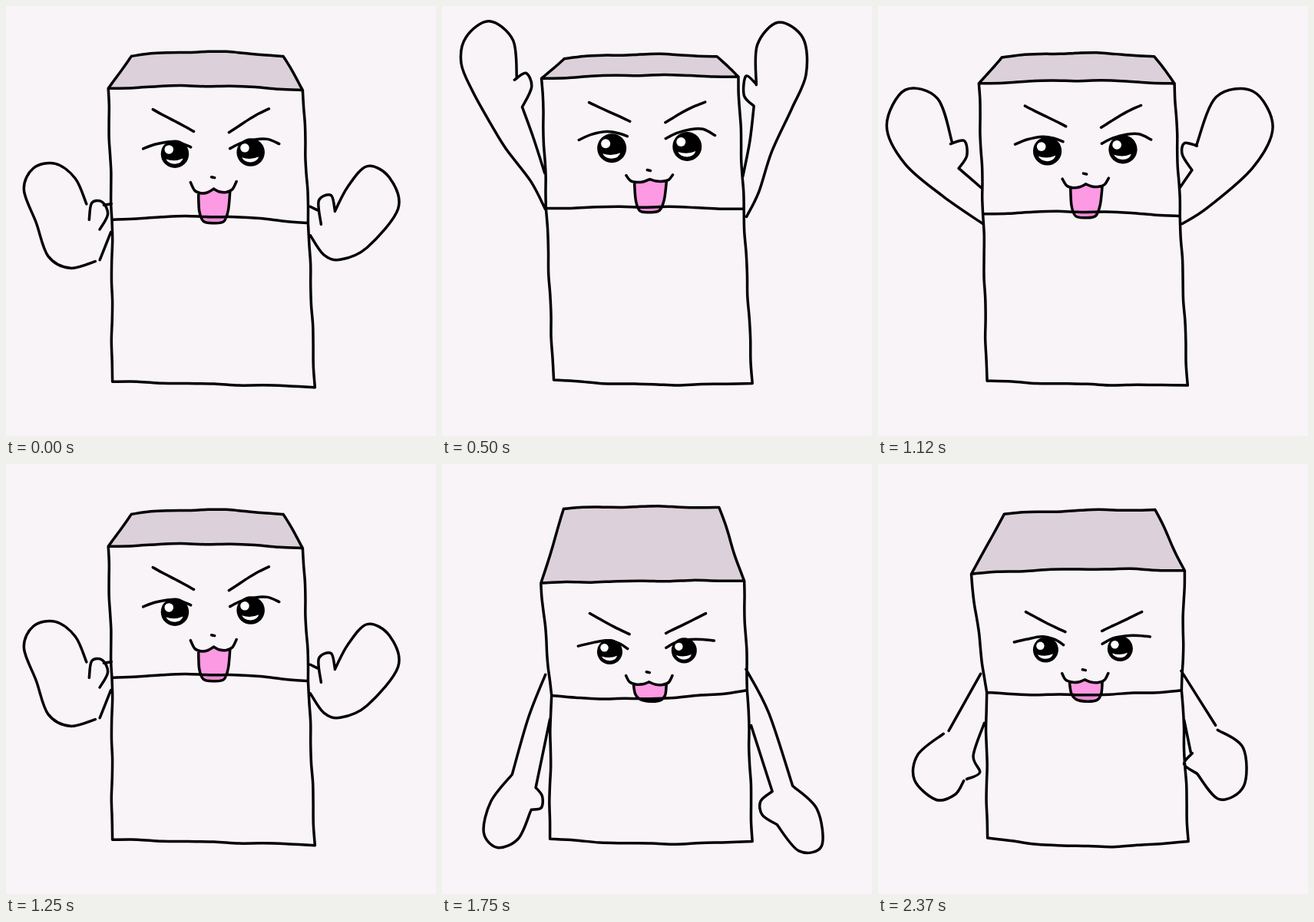
Recreate the animation shown at these times as an HTML page. Size 560 by 560 pixels, loop 2500 ms.

```html
<!DOCTYPE html>
<html lang="en">
<head>
<meta charset="utf-8">
<title>Cheering box</title>
<style>
  html, body { margin: 0; width: 100%; height: 100%; overflow: hidden; background: #f8f4f8; }
  svg { display: block; width: 100vw; height: 100vh; }
  .ink { fill: none; stroke: #000; stroke-width: 3.5; stroke-linecap: round; stroke-linejoin: round; }
  .roof { fill: #dcd1da; }
  .tongue { fill: #fc9ae4; }
  .chin { fill: #e68ccf; }
  .shine { fill: #fff; }

  .pose { visibility: hidden; animation: 2500ms step-end infinite; }
  .rest { animation-name: rest; animation-duration: 1250ms; }
  .mid { animation-name: mid; }
  .peak { animation-name: peak; }
  .over { animation-name: over; }
  .down { animation-delay: -1250ms; }
  @keyframes rest { 0% { visibility: visible } 20%, 100% { visibility: hidden } }
  @keyframes mid {
    0%, 20% { visibility: hidden }
    10%, 44.8% { visibility: visible }
    50%, 100% { visibility: hidden }
  }
  @keyframes peak {
    0%, 24.8% { visibility: hidden }
    20%, 34.8% { visibility: visible }
    44.8%, 100% { visibility: hidden }
  }
  @keyframes over {
    0% { visibility: hidden }
    24.8% { visibility: visible }
    34.8%, 100% { visibility: hidden }
  }
</style>
</head>
<body>
<svg id="stage" viewBox="0 0 560 560">
  <defs>
    <g id="eye">
      <circle r="19"/>
      <circle class="shine" cx="-8" cy="-6" r="6"/>
      <path class="shine" d="M-12 7Q0 11 11 6Q9 13 0 13.500Q-9 13-12 7Z"/>
    </g>
  </defs>
</svg>
<script>
// Box edges: x1, y1, x2, y2, bow. brow: y, slant. mouth: y, depth.
// Arms: "|" is a corner, ";" a new stroke.
const rest = {
  ridge: [164, 65, 361, 66, -6], brim: [133, 108, 387, 110, -5],
  waist: [138, 279, 394, 283, -7], foot: [138, 489, 402, 496, 0],
  brow: [134, 30], lid: 176, eye: 191, squint: .3, mouth: [229, 14], tongue: 282,
  arms: '105,258 90,225 65,205 36,211 24,240 39,283 55,326 83,342 116,332;' +
    '109,278 112,257 126,256 133,272 122,291; 128,260 138,258; 136,295 122,330;' +
    '429,267 445,235 470,209 500,223 510,264 470,314 435,331 413,324 397,299;' +
    '411,285 407,254 423,246 429,266; 396,262 407,267'
};
const raised = {
  ridge: [160, 68, 358, 66, -4], brim: [130, 95, 386, 93, -4],
  waist: [136, 264, 393, 265, -3], foot: [145, 487, 404, 491, 4],
  brow: [125, 26], lid: 163, eye: 183.5, squint: 0, mouth: [220, 9], tongue: 268,
  arms: '98,94 92,45 62,20 32,40 25,75 40,112 64,156 84,187 115,229 135,265;' +
    '95,96 110,88 117,106 104,131 | 120,172 133,217;' +
    '410,103 410,50 438,22 470,42 474,90 455,133 430,190 412,242 397,275;' +
    '410,102 396,92 394,117 406,131 | 401,175 392,222'
};
const lowered = {
  ridge: [159, 58, 361, 57, -2], brim: [129, 155, 393, 152, -1],
  waist: [142, 302, 398, 295, 7], foot: [140, 488, 404, 491, 5],
  brow: [195, 26], lid: 230, eye: 244, squint: 1, mouth: [276, 11], tongue: 309,
  arms: '135,275 112,330 91,404 | 63,440 55,480 72,500 99,488 116,452;' +
    '141,332 122,422 | 131,433 130,448 117,450;' +
    '396,268 425,325 457,419 | 488,450 495,497 465,504 436,470 | 418,458 415,440 430,426; 402,340 430,426'
};
const falling = {
  ...lowered,
  ridge: [165, 65, 361, 60, -2], brim: [121, 143, 399, 139, -4],
  waist: [141, 298, 396, 295, 4], foot: [142, 487, 404, 491, 9],
  brow: [193, 25], lid: 225, eye: 241.5, mouth: [273, 11],
  arms: '134,274 92,348; 85,352 52,378 48,412 75,437 100,430 111,413; 139,337 124,380 132,402 115,411;' +
    '395,270 440,341; 443,347 475,370 477,420 445,436 415,403 | 399,391 410,376; 398,333 408,375'
};
const mix = (a, b) => Array.isArray(a) ? a.map((v, i) => mix(v, b[i])) : (a + b) / 2;
const rising = {};
for (const key in rest) rising[key] = mix(rest[key], raised[key]);
rising.arms = '97,178 78,120 35,110 12,155 35,205 85,248 136,284; 95,180 113,175 116,195 105,212 | 136,238;' +
  '415,182 440,118 488,112 514,158 488,210 430,262 397,284; 416,182 399,178 397,193 409,213 | 392,238';

const parse = text => text.trim().split(/\s+/).map(p => p.split(',').map(Number));

// Points along a line that sags by bow.
const edge = ([x1, y1, x2, y2, bow = 0]) => Array.from({ length: 9 }, (_, i) => {
  const t = i / 8;
  return [x1 + (x2 - x1) * t, y1 + (y2 - y1) * t + bow * 4 * t * (1 - t)];
});

// Unsteady pen; lift shifts the redrawn poses.
const pen = (seed, lift) => ([x, y]) => [
  x + .7 * Math.sin(x * .04 + y * .07 + seed),
  y + .7 * Math.sin(x * .07 - y * .04 + seed) + lift
];

// Smooth path through the points of each run; runs meet in corners.
function curve(runs, move) {
  let d = '';
  for (const run of runs) {
    const p = run.map(move);
    d += (d ? 'L' : 'M') + p[0];
    for (let i = 0; i < p.length - 1; i++) {
      const b = p[i], c = p[i + 1], a = p[i - 1] || b, e = p[i + 2] || c;
      const c1 = b.map((v, k) => v + (c[k] - a[k]) / 6);
      const c2 = c.map((v, k) => v - (e[k] - b[k]) / 6);
      d += `C${c1} ${c2} ${c}`;
    }
  }
  return d;
}

function armStrokes(text) {
  return text.split(';').map(stroke => {
    const runs = stroke.split('|').map(parse);
    runs.slice(1).forEach((run, i) => run.unshift(runs[i].at(-1)));
    return runs;
  });
}

function boxStrokes({ ridge, brim, waist, foot }) {
  const link = (a, b, k) => edge([a[k], a[k + 1], b[k], b[k + 1]]);
  const roof = [edge(ridge), link(ridge, brim, 2), edge(brim).reverse(), link(brim, ridge, 0)];
  const side = k => [link(brim, waist, k), link(waist, foot, k)];
  return [roof, side(0), side(2), [edge(waist)], [edge(foot)]];
}

function faceStrokes({ brow: [by, slant], lid, squint, mouth: [my, depth], tongue }) {
  const lip = [[30, 0], [25, .75], [17, 1], [8, .95], [0, .65]].map(([x, k]) => [x, my + depth * k]);
  const half = side => lip.map(([x, y]) => [270 + side * x, y]);
  const top = my + depth;
  const side = [[21, top], [19, top + (tongue - top) * .6], [13, tongue - 2]];
  return {
    tongue: [[...side.map(([x, y]) => [271 - x, y]), [271, tongue],
      ...side.map(([x, y]) => [271 + x, y]).reverse()]],
    lines: [
      [edge([192, by, 244, by + slant])],
      [edge([291, by + slant, 343, by, -1])],
      [[[178, lid + 12 - 5 * squint], [194, lid + 4], [214, lid], [230, lid + 3], [241, lid + 7 + 3 * squint]]],
      [[[292, lid + 9 + squint], [306, lid + 2], [324, lid - 2], [340, lid - 2], [355, lid + 6 - 6 * squint]]],
      [[[267, my - 6], [271, my - 5]]],
      [half(-1), half(1).reverse()]
    ]
  };
}

function draw(pose, name, seed = 0, lift = 0) {
  const move = pen(seed, lift);
  const fill = (cls, d) => `<path class="${cls}" d="${d}Z"/>`;
  const box = boxStrokes(pose), face = faceStrokes(pose);
  const strokes = [...box, face.tongue, ...face.lines, ...armStrokes(pose.arms)];
  const waistY = edge(pose.waist)[4][1] + lift;
  const chinY = 2 * (pose.tongue + lift) - waistY;
  const [lipY, depth] = pose.mouth;
  const peak = move([270, lipY + depth * .65]);
  const eye = (x, y) =>
    `<use href="#eye" transform="translate(${move([x - 3 * pose.squint, y])}) scale(${1 - .13 * pose.squint})"/>`;
  return `<g class="pose ${name}">` +
    fill('roof', curve(box[0], move)) +
    fill('tongue', curve(face.tongue, move) + 'L' + peak) +
    fill('chin', `M255 ${waistY}Q271 ${chinY} 287 ${waistY}`) +
    eye(221, pose.eye + 1) + eye(319, pose.eye - 1) +
    `<path class="ink" d="${strokes.map(s => curve(s, move)).join('')}"/></g>`;
}

document.getElementById('stage').insertAdjacentHTML('beforeend',
  draw(rest, 'rest') +
  draw(rising, 'mid') +
  draw(raised, 'peak') +
  draw(raised, 'over', 3, -2) +
  draw(falling, 'mid down') +
  draw(lowered, 'peak down') +
  draw(lowered, 'over down', 3, 2));
</script>
</body>
</html>
```
